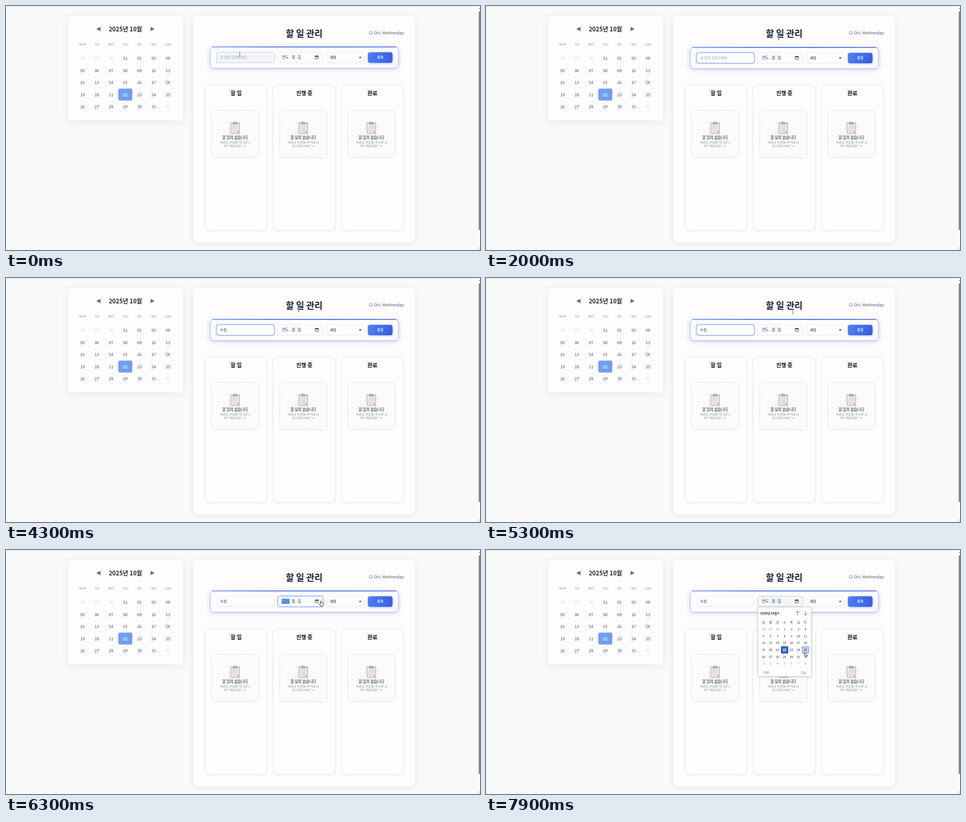
An HTML page with a canvas that plays this animation: 800 px wide and 413 px high, repeating every 8 s.

```html
<!DOCTYPE html>
<html lang="ko">
<head>
<meta charset="utf-8">
<title>할 일 관리</title>
<style>
html, body { margin: 0; width: 100%; height: 100%; overflow: hidden; background: #f9f9fa; }
canvas { display: block; width: 800px; height: 413px; }
</style>
</head>
<body>
<canvas id="stage"></canvas>
<script>
const LOOP = 8000;
const FAMILY = '"Noto Sans CJK KR", "Noto Sans KR", "Noto Sans CJK JP", "Noto Sans", sans-serif';
const canvas = document.getElementById('stage');
const ctx = canvas.getContext('2d');
const dpr = window.devicePixelRatio || 1;
canvas.width = 800 * dpr;
canvas.height = 413 * dpr;

const clamp = v => Math.max(0, Math.min(1, v));
const ease = v => { const p = clamp(v); return p * p * (3 - 2 * p); };
const within = (p, x, y, w, h) => p.x >= x && p.x < x + w && p.y >= y && p.y < y + h;

// y is the visual middle of the line
function text(str, x, y, size, { color = '#2f3747', weight = 400, align = 'center', italic = false } = {}) {
  ctx.font = `${italic ? 'italic ' : ''}${weight} ${size}px ${FAMILY}`;
  ctx.textAlign = align;
  ctx.textBaseline = 'alphabetic';
  ctx.fillStyle = color;
  ctx.fillText(str, x, y + size * 0.37);
}

function box(x, y, w, h, r, { fill, stroke, line = 0.7, dash = [], shadow, blur = 0, dy = 0 } = {}) {
  ctx.save();
  ctx.beginPath();
  ctx.roundRect(x, y, w, h, r);
  if (fill) {
    ctx.save();
    if (shadow) {
      ctx.shadowColor = shadow;
      ctx.shadowBlur = blur * dpr;
      ctx.shadowOffsetY = dy * dpr;
    }
    ctx.fillStyle = fill;
    ctx.fill();
    ctx.restore();
  }
  if (stroke) {
    ctx.strokeStyle = stroke;
    ctx.lineWidth = line;
    ctx.setLineDash(dash);
    ctx.stroke();
  }
  ctx.restore();
}

function polygon(points, fill, stroke, line = 0.7) {
  ctx.beginPath();
  points.forEach(([x, y]) => ctx.lineTo(x, y));
  ctx.closePath();
  if (fill) { ctx.fillStyle = fill; ctx.fill(); }
  if (stroke) { ctx.strokeStyle = stroke; ctx.lineWidth = line; ctx.stroke(); }
}

function strokePath(points, color, line) {
  ctx.beginPath();
  points.forEach(([x, y]) => ctx.lineTo(x, y));
  ctx.strokeStyle = color;
  ctx.lineWidth = line;
  ctx.stroke();
}

function blend(x0, y0, x1, y1, ...colors) {
  const g = ctx.createLinearGradient(x0, y0, x1, y1);
  colors.forEach((c, i) => g.addColorStop(i / (colors.length - 1), c));
  return g;
}

function drawPage() {
  ctx.fillStyle = '#f9f9fa';
  ctx.fillRect(0, 0, 800, 413);
  ctx.fillStyle = '#eeeeef';
  ctx.fillRect(0, 0, 800, 0.8);
  ctx.fillStyle = '#fcfcfc';
  ctx.fillRect(797, 0, 3, 413);
  box(797.8, 9, 3, 370, 1.2, { fill: '#878787' });
  polygon([[798, 5], [799.3, 3], [800, 5]], '#777');
  polygon([[798, 409], [799.3, 411], [800, 409]], '#777');

  const card = { fill: '#fdfdfe', shadow: 'rgba(30,40,60,.09)', blur: 11, dy: 2 };
  box(104.5, 17, 194.5, 177, 6.5, card);
  box(316, 17, 375, 383, 6.5, card);
}

function drawMonth() {
  text('2025년 10월', 201.5, 39, 10, { weight: 700, color: '#1e2233' });
  polygon([[152.5, 39], [159.3, 35.6], [159.3, 42.4]], '#63647c');
  polygon([[250.9, 39], [244.1, 35.6], [244.1, 42.4]], '#63647c');
  'MON TUE WED THU FRI SAT SUN'.split(' ').forEach((name, i) =>
    text(name, 129.3 + i * 24, 65.5, 5, { weight: 500, color: '#8d94a1' }));
  box(189.5, 139.7, 23.7, 20.2, 3, { fill: '#6f9ff2' });
  for (let i = 0; i < 35; i++) {
    const raw = i - 2;
    const day = raw < 1 ? raw + 30 : raw > 31 ? raw - 31 : raw;
    const outside = raw < 1 || raw > 31;
    const today = raw === 22;
    text(String(day).padStart(2, '0'), 129.3 + (i % 7) * 24, 88.6 + Math.floor(i / 7) * 20.5, 6.67, {
      color: today ? '#fff' : outside ? '#d3d5d9' : '#3b4250',
      weight: today ? 700 : 400
    });
  }
}

function drawClipboard(x, y) {
  ctx.save();
  ctx.translate(x, y);
  box(-8.2, -9.2, 16.4, 19.6, 1.3, { fill: '#e2bd9f' });
  polygon([[-6.4, -7], [6.4, -7], [6.4, 5], [3, 8.7], [-6.4, 8.7]], '#eeedf3');
  polygon([[6.4, 5], [3, 5], [3, 8.7]], '#c8cad9');
  for (let i = 0; i < 6; i++) {
    ctx.fillStyle = '#c7c9d6';
    ctx.fillRect(-4.7, -3.8 + i * 1.9, i > 4 ? 6.5 : 9.4, 0.7);
  }
  box(-4.2, -8.6, 8.4, 3, 0.8, { fill: '#a5a8bd' });
  box(-2, -10.5, 4, 3.2, 1.2, { fill: '#b3b5c8' });
  ctx.restore();
}

function sparkle(x, y, r) {
  const points = Array.from({ length: 8 }, (_, i) => {
    const a = i * Math.PI / 4, d = i % 2 ? r * 0.32 : r;
    return [x + d * Math.cos(a), y + d * Math.sin(a)];
  });
  polygon(points, '#eab572');
}

function drawBoard() {
  ['할 일', '진행 중', '완료'].forEach((name, i) => {
    const x = 336.2 + i * 115, mid = x + 50.4;
    box(x, 133.5, 104.6, 246, 8, {
      fill: '#fdfdfe', stroke: '#e6e8ec', shadow: 'rgba(30,40,60,.1)', blur: 4, dy: 1
    });
    text(name, x + 52.3, 148, 9.17, { weight: 700, color: '#14161c' });
    box(x + 10.6, 176.8, 80.2, 79.6, 7, { fill: '#fbfbfc', stroke: '#cdd0d6', line: 0.85, dash: [2.5, 1.6] });
    drawClipboard(mid, 206);
    text('할 일이 없습니다', mid, 222.3, 6.25, { weight: 700, color: '#565d6c' });
    const note = { italic: true, color: '#9297a5' };
    text('새로운 작업을 여기로 드', mid, 230.6, 5.417, note);
    text('래그해보세요!', mid - 3.8, 236.8, 5.417, note);
    sparkle(mid + 17.2, 236.8, 2.5);
    sparkle(mid + 14.3, 235, 1.1);
    sparkle(mid + 14.5, 238.7, 0.9);
  });
}

function field(x, w, { focus, hover }) {
  if (focus) box(x, 78.9, w, 18, 4.2, { stroke: '#dce7fc', line: 3 });
  box(x, 78.9, w, 18, 4, {
    fill: hover && !focus ? '#f3f5f9' : '#fdfdfe',
    stroke: focus ? '#6d9bee' : hover ? '#b9c2d0' : '#e0e4ea',
    line: focus ? 0.9 : 0.75
  });
}

function drawForm(s) {
  ctx.save();
  ctx.translate(0, -0.83 * s.lift);
  box(344.5, 70, 318, 36.2, 6.5, {
    fill: '#fdfdff', stroke: '#9cafe8', line: 0.9, shadow: 'rgba(70,95,225,.27)', blur: 9, dy: 1.5
  });
  ctx.fillStyle = blend(347, 0, 660, 0, '#7f9ae6', '#4264d2', '#3f5ccc', '#5471d6');
  ctx.fillRect(348, 69.6, 311, 1.3);

  field(355, 98, { focus: s.focus === 'task', hover: s.hover === 'task' });
  if (s.value) text(s.value, 361.6, 88, 5.83, { align: 'left', color: '#20242d' });
  else text('할 일을 입력하세요', 361.6, 88, 5.83, { align: 'left', color: '#9ba1ad' });
  if (s.caret) {
    ctx.fillStyle = '#30343c';
    const width = s.value ? ctx.measureText(s.value).width : 0;
    ctx.fillRect(361.7 + width, 84.2, 0.6, 7.6);
  }

  field(458.6, 76.6, { focus: s.focus === 'date', hover: s.hover === 'date' });
  const selected = s.focus === 'date';
  if (selected) {
    ctx.fillStyle = '#3f77d4';
    ctx.fillRect(465.2, 83.3, 12.9, 8.6);
  }
  const part = { color: '#333945' };
  text('연도', 471.6, 88, 6.25, selected ? { color: '#c6dbfb' } : part);
  text('-', 480, 88, 6.25, part);
  text('월', 485, 88, 6.25, part);
  text('-', 490, 88, 6.25, part);
  text('일', 495.2, 88, 6.25, part);
  box(522, 85.5, 5, 4.8, 0.5, { stroke: '#24272e', line: 0.7 });
  ctx.fillStyle = '#24272e';
  ctx.fillRect(521.8, 85.2, 5.4, 1.5);
  ctx.fillRect(522.8, 84.3, 0.7, 1);
  ctx.fillRect(525.5, 84.3, 0.7, 1);

  field(541, 64, {});
  text('예정', 547, 88, 5.83, { align: 'left', weight: 500, color: '#20242d' });
  polygon([[595.6, 87], [600, 87], [597.8, 89.4]], '#20242d');

  box(610.8, 79.2, 41.6, 17.8, 4, {
    fill: blend(611, 79, 652, 97, '#4b82f2', '#3a5be0'), shadow: 'rgba(60,95,225,.35)', blur: 4, dy: 1
  });
  text('추가', 631.5, 88, 5.83, { weight: 700, color: '#fff' });
  ctx.restore();
}

function drawPicker(mouse) {
  box(459, 96.6, 90.4, 117.4, 0.6, {
    fill: '#fefefe', stroke: '#c3c6cc', line: 0.8, shadow: 'rgba(0,0,0,.16)', blur: 4, dy: 1
  });
  text('2025년 10월', 463, 107, 5, { weight: 700, align: 'left', color: '#16181d' });
  polygon([[491.6, 106.2], [495, 106.2], [493.3, 108.4]], '#16181d');
  [[526, 1], [539.2, -1]].forEach(([x, dir]) => {
    strokePath([[x, 107 + 3.6 * dir], [x, 107 - 3.6 * dir]], '#484b52', 0.7);
    strokePath([[x - 3, 107 - 0.5 * dir], [x, 107 - 3.6 * dir], [x + 3, 107 - 0.5 * dir]], '#484b52', 0.7);
  });
  [...'일월화수목금토'].forEach((d, i) => text(d, 468.6 + i * 11.75, 122, 5, { color: '#30343b' }));
  for (let i = 0; i < 42; i++) {
    const raw = i - 2;
    const day = raw < 1 ? raw + 30 : raw > 31 ? raw - 31 : raw;
    const outside = raw < 1 || raw > 31;
    const x = 468.6 + (i % 7) * 11.75, y = 134 + Math.floor(i / 7) * 11.7;
    const today = raw === 22;
    if (today) box(x - 5.3, y - 5.4, 10.8, 10.8, 0.5, { fill: '#3d70d8', stroke: '#16233f', line: 1 });
    else if (within(mouse, x - 5.9, y - 5.85, 11.75, 11.7))
      box(x - 5.4, y - 5.4, 11, 10.8, 0.5, { fill: '#c3d0ee', stroke: '#6d80b4', line: 0.8 });
    text(String(day), x, y, 5, {
      color: today ? '#fff' : outside ? '#858c99' : '#20232a', weight: today ? 700 : 400
    });
  }
  text('삭제', 472.5, 207, 5, { color: '#4a79d4' });
  text('오늘', 535.8, 207, 5, { color: '#4a79d4' });
}

function drawCursor({ x, y }, kind) {
  ctx.save();
  ctx.translate(x, y);
  ctx.lineJoin = 'round';
  if (kind === 'beam') {
    for (const [color, line] of [['rgba(255,255,255,.8)', 1.4], ['#30333a', 0.65]]) {
      strokePath([[0, -3], [0, 3]], color, line);
      strokePath([[-1.3, -3.4], [0, -2.9], [1.3, -3.4]], color, line);
      strokePath([[-1.3, 3.4], [0, 2.9], [1.3, 3.4]], color, line);
    }
  } else if (kind === 'hand') {
    polygon([[-1.2, -4], [-0.2, -4], [0.2, -0.9], [1.2, -1.3], [2.2, -0.8], [3.2, -0.7], [3.9, 0.2],
      [3.6, 2.6], [2.9, 4.5], [-1, 4.5], [-2.9, 1.6], [-2.8, 0.7], [-1.3, 1.4]], '#fff', '#24272d', 0.8);
  } else {
    polygon([[0, 0], [0, 7], [1.6, 5.6], [2.8, 8.2], [4, 7.6], [2.9, 5.1], [5, 5]], '#fff', '#24272d', 0.8);
  }
  ctx.restore();
}

const ROUTE = [
  // start, end, x, y
  [0, 0, 394.5, 82],
  [400, 850, 494, 54],
  [4450, 4600, 518, 57],
  [5500, 6100, 532, 90.5],
  [7050, 7500, 526, 131],
  [7650, 7900, 537.8, 173.5]
];

function mouseAt(t) {
  let { x, y } = { x: 0, y: 0 };
  for (const [start, end, tx, ty] of ROUTE) {
    if (t < start) break;
    const p = end > start ? ease((t - start) / (end - start)) : 1;
    x += (tx - x) * p;
    y += (ty - y) * p;
  }
  return { x, y };
}

const TYPING = [[2700, 't'], [3000, ''], [3400, 'ㅅ'], [3500, '수'], [3800, '수저'], [4000, '수정']];

function valueAt(t) {
  return TYPING.reduce((value, [start, next]) => t >= start ? next : value, '');
}

function draw(t) {
  const mouse = mouseAt(t);
  const picker = t >= 7000;
  const overForm = within(mouse, 344, 70, 319, 36);
  const focus = t < 300 ? '' : t < 6000 ? 'task' : picker ? '' : 'date';
  const hover = picker ? 'date'
    : within(mouse, 355, 78, 98, 19) ? 'task'
    : within(mouse, 458, 78, 77, 19) ? 'date' : '';
  const lift = t < 3000 ? 1 - ease((t - 500) / 300) : ease((t - 5700) / 300);
  const caret = focus === 'task' && t % 1000 >= (t >= 3000 && t < 3500 ? 0 : 400);

  ctx.setTransform(dpr, 0, 0, dpr, 0, 0);
  drawPage();
  drawMonth();
  text('할 일 관리', 503.3, 46, 15, { weight: 700, color: '#1b1d2a' });
  text('22 Oct, Wednesday', 671.2, 45.8, 6.67, { align: 'right', color: '#525866' });
  drawBoard();
  drawForm({ focus, hover, lift, caret, value: valueAt(t) });
  if (picker) drawPicker(mouse);
  const kind = t >= 7100 ? 'arrow' : overForm && mouse.x > 519 ? 'hand' : 'beam';
  drawCursor(mouse, kind);
}

function tick(now) {
  draw(now % LOOP);
  requestAnimationFrame(tick);
}
requestAnimationFrame(tick);
</script>
</body>
</html>
```
